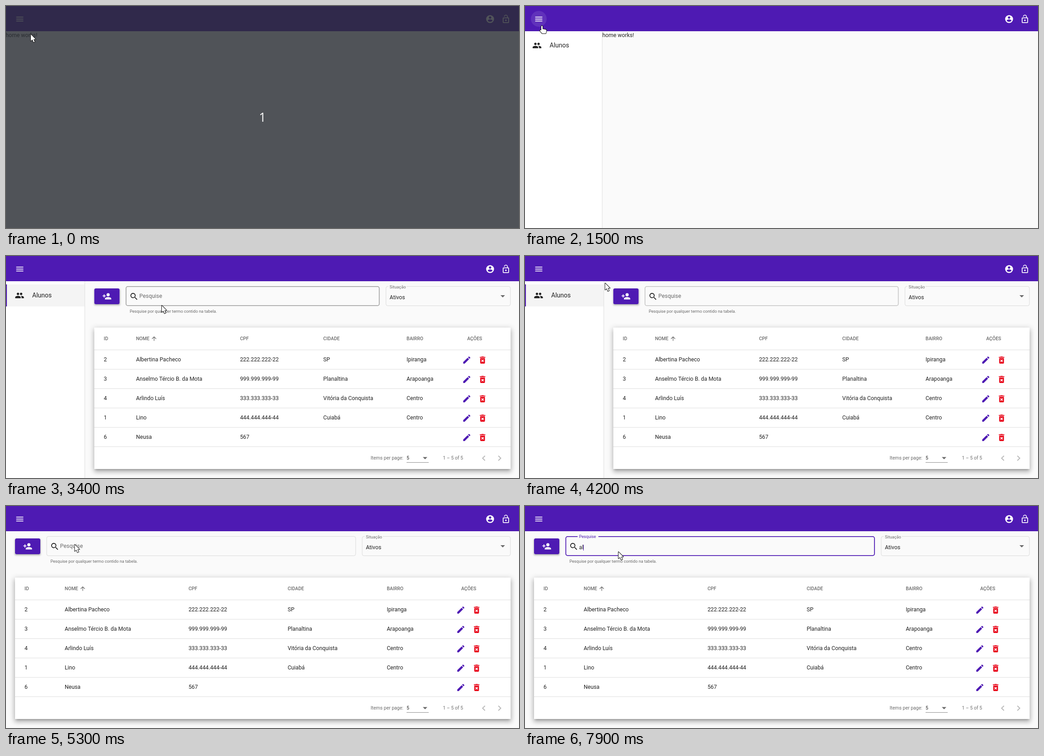
Write an HTML page with a canvas that moves like this. It is 1136 px wide and 493 px high and loops after 8 s.

```html
<!DOCTYPE html>
<html lang="pt-BR">
<head>
<meta charset="utf-8">
<title>Alunos</title>
<style>
  html, body { margin: 0; width: 100%; height: 100%; overflow: hidden; background: #fafafa; }
  canvas { display: block; }
</style>
</head>
<body>
<canvas id="stage" width="1136" height="493"></canvas>
<script>
const ctx = document.getElementById('stage').getContext('2d');
const LOOP = 8000, STEP = 100, NAV_WIDTH = 175.5;
const PURPLE = '#4e1ab3', RED = '#e8071a', INK = 'rgba(0,0,0,.87)', MUTED = 'rgba(0,0,0,.58)', LINE = 'rgba(0,0,0,.13)';

// Icons on a 24 unit grid
const icons = {
  menu: 'M3 18h18v-2H3zm0-5h18v-2H3zm0-7v2h18V6z',
  account: 'M12 2a10 10 0 1 0 0 20 10 10 0 0 0 0-20zm0 3a3 3 0 1 1 0 6 3 3 0 0 1 0-6zm0 14.2c-2.5 0-4.7-1.3-6-3.2 0-2 4-3.1 6-3.1s6 1.1 6 3.1c-1.3 1.9-3.5 3.2-6 3.2z',
  lock: 'M12 17a2 2 0 1 0 0-4 2 2 0 0 0 0 4zm6-9h-1V6A5 5 0 0 0 7 6h1.9a3.1 3.1 0 0 1 6.2 0v2H6a2 2 0 0 0-2 2v10a2 2 0 0 0 2 2h12a2 2 0 0 0 2-2V10a2 2 0 0 0-2-2zm0 12H6V10h12z',
  people: 'M16 11a3 3 0 1 0 0-6 3 3 0 0 0 0 6zm-8 0a3 3 0 1 0 0-6 3 3 0 0 0 0 6zm0 2c-2.3 0-7 1.2-7 3.5V19h14v-2.5C15 14.200 10.300 13 8 13zm8 0l-1 .05c1.200.85 2 2 2 3.450V19h6v-2.500c0-2.300-4.700-3.500-7-3.500z',
  add: 'M15 12a4 4 0 1 0 0-8 4 4 0 0 0 0 8zm-9-2V7H4v3H1v2h3v3h2v-3h3v-2zm9 4c-2.7 0-8 1.3-8 4v2h16v-2c0-2.700-5.300-4-8-4z',
  search: 'M15.5 14h-.8l-.3-.3A6.500 6.500 0 1 0 13.700 14.400l.3.3v.8l5 5 1.500-1.500zm-6 0a4.500 4.500 0 1 1 0-9 4.500 4.500 0 0 1 0 9z',
  edit: 'M3 17.250V21h3.750L17.800 9.940 14.060 6.190zM20.700 7.040a1 1 0 0 0 0-1.410l-2.340-2.340a1 1 0 0 0-1.410 0l-1.830 1.830 3.750 3.750z',
  remove: 'M6 19a2 2 0 0 0 2 2h8a2 2 0 0 0 2-2V7H6zm2.460-7.120l1.410-1.410L12 12.590l2.120-2.120 1.410 1.410L13.410 14l2.120 2.120-1.410 1.410L12 15.410l-2.120 2.120-1.410-1.410L10.590 14zM15.500 4l-1-1h-5l-1 1H5v2h14V4z',
  prev: 'M15.400 7.400L14 6l-6 6 6 6 1.400-1.400L10.800 12z',
  next: 'M8.600 7.400L10 6l6 6-6 6-1.400-1.400L13.200 12z',
  up: 'M4 12l1.400 1.400L11 7.800V20h2V7.800l5.600 5.600L20 12l-8-8z'
};
for (const name in icons) icons[name] = new Path2D(icons[name]);

const pointers = {
  arrow: new Path2D('M0 0V14.5L3.500 11.500 6 17.500 8.500 16.500 6 10.700H10.500Z'),
  hand: new Path2D('M-2 10V1.500A1.500 1.500 0 0 1 1 1.500V7L8 8.500Q10 9 9.500 11L8 17H0L-5 11Q-4 8 -2 10Z'),
  beam: new Path2D('M-3-7.500H3V-5.500H1V5.500H3V7.500H-3V5.500H-1V-5.500H-3Z')
};
// time, x, y, shape
const pointerKeys = [
  [0, 55, 63, 'arrow'], [300, 52, 66, 'beam'], [500, 52, 66, 'beam'], [600, 55, 52, 'arrow'],
  [900, 31, 30, 'hand'], [1400, 31, 30, 'hand'], [1600, 45, 58, 'arrow'], [1700, 58, 78, 'hand'],
  [2000, 75, 88, 'hand'], [2500, 75, 88, 'hand'], [2600, 89, 109, 'arrow'], [2700, 92, 113, 'arrow'],
  [3200, 280, 126, 'arrow'], [3400, 345, 110, 'arrow'], [3500, 350, 100, 'beam'], [3800, 355, 90, 'beam'],
  [3900, 355, 90, 'beam'], [4000, 310, 86, 'arrow'], [4400, 45, 35, 'hand'], [4500, 31, 26, 'hand'],
  [4800, 31, 26, 'hand'], [4900, 43, 53, 'arrow'], [5500, 207, 102, 'arrow'], [LOOP, 207, 102, 'arrow']
];

const headings = ['ID', 'NOME', 'CPF', 'CIDADE', 'BAIRRO'];
const students = [
  ['2', 'Albertina Pacheco', '222.222.222-22', 'SP', 'Ipiranga'],
  ['3', 'Anselmo Tércio B. da Mota', '999.999.999-99', 'Planaltina', 'Arapoanga'],
  ['4', 'Arlindo Luís', '333.333.333-33', 'Vitória da Conquista', 'Centro'],
  ['1', 'Lino', '444.444.444-44', 'Cuiabá', 'Centro'],
  ['6', 'Neusa', '567', '', '']
];

const clamp = v => Math.min(1, Math.max(0, v));
const mix = (a, b, p) => a + (b - a) * p;

// cubic-bezier(.25, .8, .25, 1)
function ease(x) {
  x = clamp(x);
  let low = 0, high = 1;
  for (let i = 0; i < 24; i++) {
    const u = (low + high) / 2;
    if (.75 * u * (1 - u) + u ** 3 < x) low = u; else high = u;
  }
  return 2.4 * low * (1 - low) ** 2 + 3 * low * low * (1 - low) + low ** 3;
}
const progress = (t, start, duration) => ease((t - start) / duration);

function rect(x, y, w, h, color) {
  ctx.fillStyle = color;
  ctx.fillRect(x, y, w, h);
}
function text(s, x, middle, size, color, weight = 400) {
  ctx.font = `${weight} ${size}px Roboto, sans-serif`;
  ctx.fillStyle = color;
  ctx.fillText(s, x, middle + size * .355);
  return ctx.measureText(s).width;
}
function icon(name, x, y, color, size = 21) {
  ctx.save();
  ctx.translate(x - size / 2, y - size / 2);
  ctx.scale(size / 24, size / 24);
  ctx.fillStyle = color;
  ctx.fill(icons[name]);
  ctx.restore();
}
function roundRect(x, y, w, h, r, color) {
  ctx.beginPath();
  ctx.roundRect(x, y, w, h, r);
  ctx.fillStyle = color;
  ctx.fill();
}
function circle(x, y, r, color) {
  ctx.beginPath();
  ctx.arc(x, y, r, 0, 7);
  ctx.fillStyle = color;
  ctx.fill();
}
function triangle(x, y) {
  ctx.beginPath();
  ctx.moveTo(x - 5, y);
  ctx.lineTo(x + 5, y);
  ctx.lineTo(x, y + 5);
  ctx.fillStyle = MUTED;
  ctx.fill();
}
// Casts only the shadow: the shape itself stays off stage
function shadow(x, y, w, h, dy, blur, spread, alpha) {
  ctx.save();
  ctx.shadowColor = `rgba(0,0,0,${alpha})`;
  ctx.shadowBlur = blur;
  ctx.shadowOffsetX = 3000;
  ctx.shadowOffsetY = dy;
  rect(x - spread - 3000, y - spread, w + 2 * spread, h + 2 * spread, '#000');
  ctx.restore();
}
function outline(x, right, color, width, gapStart, gapEnd) {
  ctx.save();
  if (gapEnd) {
    ctx.beginPath();
    ctx.rect(0, 0, 1136, 493);
    ctx.rect(x + gapStart, 64, gapEnd - gapStart, 8);
    ctx.clip('evenodd');
  }
  ctx.beginPath();
  ctx.roundRect(x + width / 2, 67 + width / 2, right - x - width, 44 - width, 4);
  ctx.strokeStyle = color;
  ctx.lineWidth = width;
  ctx.stroke();
  ctx.restore();
}

function drawNav(t, open) {
  if (open <= 0) return;
  const active = t >= 2500;
  ctx.save();
  ctx.translate((open - 1) * NAV_WIDTH, 0);
  rect(0, 56, 174, 437, '#fff');
  rect(174, 56, 1, 437, '#dedede');
  if (active || t >= 1700) rect(0, 63, 174, 49, '#f4f4f4');
  if (t >= 2400 && t < 3000) {
    ctx.save();
    ctx.beginPath();
    ctx.rect(0, 63, 174, 49);
    ctx.clip();
    circle(75, 88, 102 * progress(t, 2400, 400), `rgba(0,0,0,${.1 * clamp((3000 - t) / 400)})`);
    ctx.restore();
  }
  if (active) rect(0, 63, 2, 49, PURPLE);
  icon('people', 30, 87.5, INK);
  text('Alunos', 58, 87.5, 14, INK);
  ctx.restore();
}

function drawFilters(t, left, width) {
  shadow(left, 72, 56, 35, 2, 4, 0, .35);
  roundRect(left, 72, 56, 35, 3.5, '#fff');
  ctx.globalAlpha = progress(t, 2600, 400);
  roundRect(left, 72, 56, 35, 3.5, PURPLE);
  ctx.globalAlpha = 1;
  icon('add', left + 28, 89.5, '#fff');

  const right = left + width, status = right - width * .3;
  const field = left + 69.5, fieldRight = status - 13.5;
  const focused = t >= 5600;
  if (focused) {
    outline(field, fieldRight, PURPLE, 1.8, 27, 73);
  } else {
    const hover = t < 4000 ? progress(t, 3340, 600) : t < 5400 ? 1 - progress(t, 3980, 600) : progress(t, 5400, 600);
    outline(field, fieldRight, LINE, 1);
    if (hover > 0) outline(field, fieldRight, `rgba(0,0,0,${.87 * hover})`, 1.75);
  }
  icon('search', field + 18.5, 90, INK);
  const float = progress(t, 5600, 400);
  text('Pesquise', field + 30.2, mix(89, 68, float), mix(12.4, 9.2, float), focused ? PURPLE : MUTED);
  text('Pesquise por qualquer termo contido na tabela.', field + 9, 122.5, 9.2, MUTED);

  const typed = t >= 7900 ? 'al' : t >= 7700 ? 'a' : '';
  const end = field + 30.3 + text(typed, field + 30.3, 92, 12.25, INK);
  const caret = (t >= 5600 && t < 6100) || (t >= 6700 && t < 7300) || typed;
  if (caret) rect(Math.round(end), 86, 1, 13, PURPLE);

  outline(status, right, LINE, 1, 6, 46);
  text('Situação', status + 8.7, 68.5, 9.2, MUTED);
  text('Ativos', status + 8.7, 92, 12.25, INK);
  triangle(1100, 87);
}

function drawTable(t, left, width) {
  const rows = t >= 2700 ? students : [];
  const bottom = 258 + rows.length * 43, height = bottom - 159;
  shadow(left, 159, width, height, 4.4, 4.4, -2.6, .2);
  shadow(left, 159, width, height, 7, 9, 1, .14);
  shadow(left, 159, width, height, 2.6, 12, 1.8, .18);
  rect(left, 159, width, height, '#fff');

  const columns = [21, width * .1 + .2, width * .35, width * .55, width * .75].map(x => left + x);
  headings.forEach((name, i) => text(name, columns[i], 183.500, 10.5, MUTED, 500));
  icon('up', columns[1] + 40, 183.5, MUTED, 15);
  const actions = left + width * .925 - 10.5;
  text('AÇÕES', actions - 16.7, 183.5, 10.5, MUTED, 500);
  rect(left, 208, width, 1, LINE);

  rows.forEach((row, i) => {
    const y = 230 + i * 43;
    row.forEach((cell, c) => text(cell, columns[c], y, 12.25, INK));
    icon('edit', actions - 17.5, y + 1, PURPLE);
    icon('remove', actions + 17.5, y + 1, RED);
    rect(left, y + 21, width, 1, LINE);
  });

  const y = bottom - 24.5;
  const rangeX = rows.length ? 967.5 : 985.5;
  text(rows.length ? '1 – 5 of 5' : '0 of 0', rangeX, y, 10.5, MUTED);
  text('Items per page:', rangeX - 160, y, 10.5, MUTED);
  text('5', rangeX - 80.5, y, 10.5, INK);
  triangle(rangeX - 39.5, y - 2);
  rect(rangeX - 80.5, Math.round(y + 9), 49, 1, 'rgba(0,0,0,.45)');
  icon('prev', 1058, y + .5, 'rgba(0,0,0,.28)', 24);
  icon('next', 1093, y + .5, 'rgba(0,0,0,.28)', 24);
}

function drawHeader(t) {
  rect(0, 0, 1136, 56, PURPLE);
  for (const click of [1200, 4700]) {
    const age = t - click;
    if (age >= 0 && age < 600) circle(30.5, 28.5, 17.5 * ease((age + 60) / 225), `rgba(255,255,255,${.1 * clamp((600 - age) / 300)})`);
  }
  icon('menu', 30.5, 29, '#fff');
  icon('account', 1072, 29, '#fff');
  icon('lock', 1107, 29, '#fff');
}

function drawPointer(t) {
  const next = pointerKeys.findIndex(key => key[0] > t);
  const [start, x, y, shape] = pointerKeys[next - 1], [end, toX, toY] = pointerKeys[next];
  const p = (t - start) / (end - start);
  ctx.save();
  ctx.translate(mix(x, toX, p), mix(y, toY, p));
  ctx.lineWidth = shape === 'beam' ? 1.5 : 2;
  ctx.lineJoin = 'round';
  ctx.strokeStyle = '#111';
  ctx.stroke(pointers[shape]);
  ctx.fillStyle = shape === 'beam' ? '#aaa' : '#fff';
  ctx.fill(pointers[shape]);
  ctx.restore();
}

function draw(t) {
  rect(0, 0, 1136, 493, '#fafafa');
  const open = t < 4800 ? progress(t, 1230, 400) : 1 - progress(t, 4724, 400);
  const margin = open * NAV_WIDTH;
  if (t < 2500) {
    text('home works!', margin - .7, 65, 12.25, INK);
  } else {
    const left = 20 + margin, width = 1117.5 - left;
    drawFilters(t, left, width);
    drawTable(t, left, width);
  }
  drawNav(t, open);
  drawHeader(t);
  if (t < 300) {
    rect(0, 0, 1136, 493, 'rgba(41,45,51,.81)');
    ctx.font = '27px "Open Sans", sans-serif';
    ctx.textAlign = 'center';
    ctx.fillStyle = '#fff';
    ctx.fillText('1', 568, 257);
    ctx.textAlign = 'left';
  }
  drawPointer(t);
}

const began = performance.now();
function tick() {
  const elapsed = (performance.now() - began) % LOOP;
  draw(Math.floor(elapsed / STEP) * STEP);
  requestAnimationFrame(tick);
}
tick();
</script>
</body>
</html>
```
